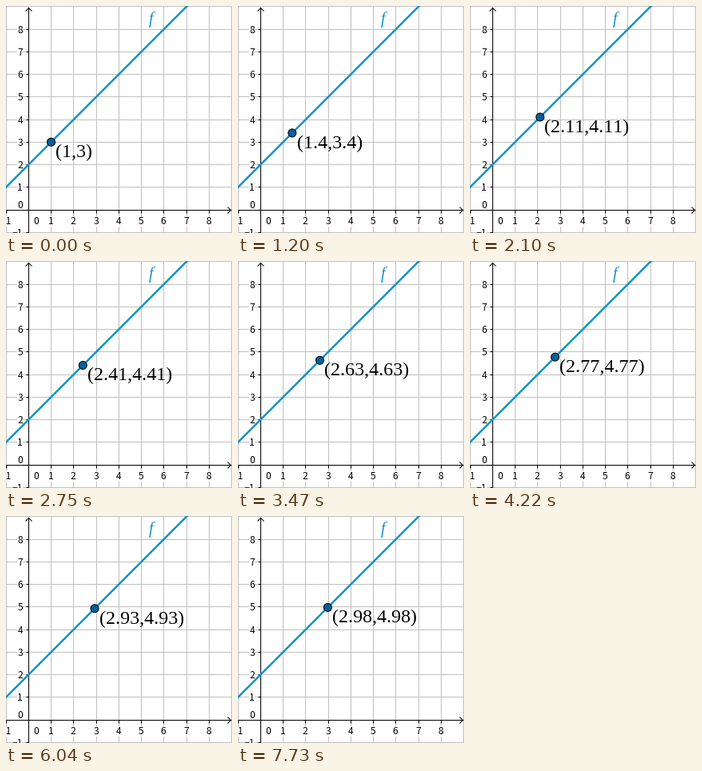
These frames come from a looping animation (283 px wide and 284 px high, 8000 ms). A matplotlib script:

```python
import math
import matplotlib.pyplot as plt
from matplotlib.animation import FuncAnimation
from matplotlib.patches import Circle

plt.rcParams["text.kerning_factor"] = 6      # no pair kerning

W, H, DPI = 283, 284, 64
PT = 72 / DPI                    # points per pixel
X0, Y0, UNIT = 28.25, 255, 28.25
BLUE, NAVY, GRID = "#1691c6", "#00619c", "#c0c0c0"

LOOP, STEP = 8000, 20            # ms
T0, T_START, T_STOP, RATE = 852, 880, 7730, 0.000645


def px(x):
    return X0 + UNIT * x


def py(y):
    return Y0 - UNIT * y


fig = plt.figure(figsize=(W / DPI, H / DPI), dpi=DPI, facecolor="white")
ax = fig.add_axes([0, 0, 1, 1])
ax.set_xlim(0, W)
ax.set_ylim(H, 0)
ax.axis("off")


def stroke(xs, ys, color, width=1, z=1):
    """Straight lines at whole coordinates snap to that pixel row or column."""
    ax.plot(xs, ys, color=color, lw=width * PT, zorder=z,
            solid_capstyle="butt", solid_joinstyle="miter")


def number(x, base, n, ha="center"):
    ax.text(x, base, str(n).replace("-", "\u2212"), size=12 * PT,
            family=["Noto Sans CJK JP", "DejaVu Sans"], ha=ha,
            va="baseline", zorder=2,
            bbox=dict(facecolor="white", edgecolor="none", pad=0.2))


# grid
for n in range(-1, 10):
    gx, gy = math.floor(px(n)), math.floor(py(n))
    stroke([gx, gx], [0, H], GRID)
    stroke([0, W], [gy, gy], GRID)

# axes with open arrowheads
ox, oy = math.floor(X0), math.floor(Y0)
cx, cy = ox + 0.5, oy + 0.5
stroke([ox, ox], [2, H], "black", z=3)
stroke([0, W - 1], [oy, oy], "black", z=3)
stroke([cx - 4, cx, cx + 4], [6.5, 2.5, 6.5], "black", z=3)
stroke([W - 5.5, W - 1.5, W - 5.5], [cy - 4, cy, cy + 4], "black", z=3)

# ticks and numbers
for n in range(-1, 9):
    gx, gy = math.floor(px(n)), math.floor(py(n))
    if n:
        stroke([gx, gx], [oy, oy + 4], "black", z=3)
        stroke([ox - 3, ox], [gy, gy], "black", z=3)
    number(gx if n else 37.5, 273, n)
    number(21, gy + 5 if n else 253, n, ha="right")

# the line y = x + 2
stroke([px(-2), px(8)], [py(0), py(10)], BLUE, 2.5, z=4)
ax.text(179, 22, "f", size=20 * PT, family="Liberation Serif",
        style="italic", color=BLUE, zorder=4)

dot = ax.add_patch(Circle((0, 0), 5, facecolor=NAVY, edgecolor="black",
                          lw=PT, zorder=6))
coords = ax.text(0, 0, "", size=24 * PT, family="Liberation Serif",
                 color="black", zorder=5)


def position(t):
    """Ease exponentially from 1 towards 3."""
    if t < T_START:
        return 1.0
    return 3 - 2 * math.exp(-RATE * (min(t, T_STOP) - T0))


def update(i):
    x = position(i * STEP)
    dot.center = px(x), py(x + 2)
    coords.set_position((px(x) + 5.75, py(x + 2) + 19))
    coords.set_text(f"({round(x, 2):g},{round(x + 2, 2):g})")
    return dot, coords


anim = FuncAnimation(fig, update, frames=LOOP // STEP, interval=STEP,
                     repeat=True, repeat_delay=0, blit=False)
plt.show()
```
